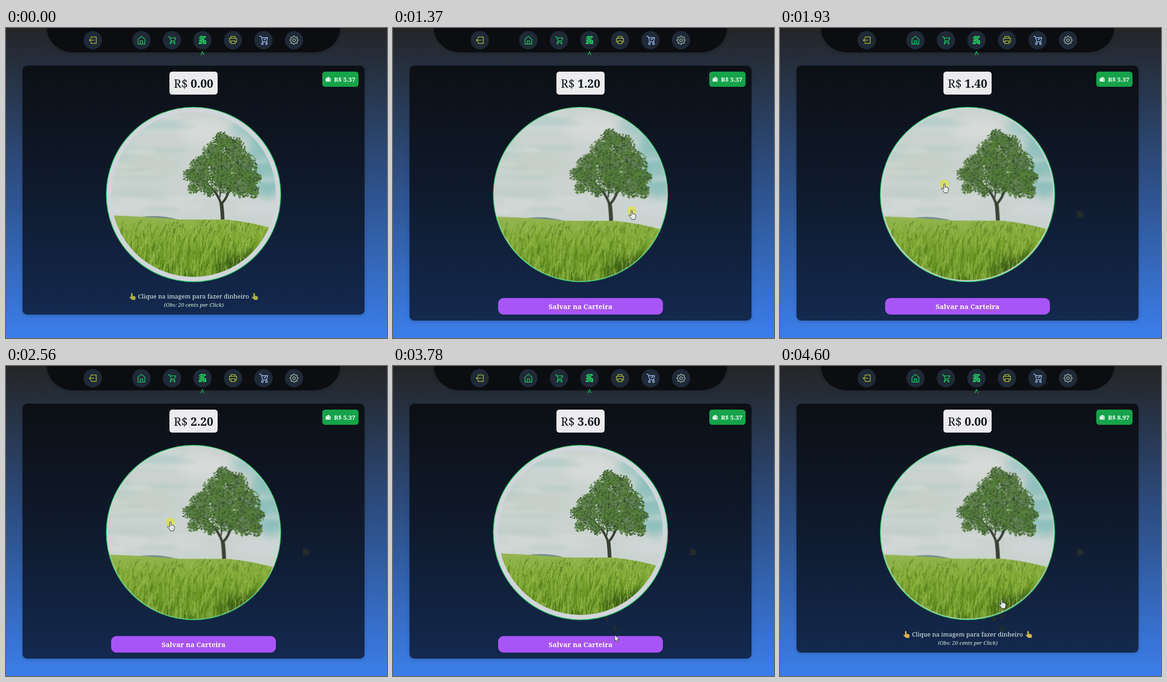
Animation of 830 by 675 pixels, one loop 4.67 s. Source, as an HTML page:

```html
<!DOCTYPE html>
<html lang="pt">
<head>
<meta charset="utf-8">
<title>Clique</title>
<style>
html, body { margin: 0; width: 100%; height: 100%; overflow: hidden; background: #2f5189; }
svg { display: block; width: 830px; height: 675px; font-family: "Noto Serif", serif; }
.line { fill: none; stroke-width: 1.6; stroke-linejoin: round; }
.lime { stroke: #a9b836; }
.green { stroke: #22c55e; }
.sky { stroke: #a5c8ff; stroke-width: 1.3; }
.grey { stroke: #9db0a4; }
.mid { text-anchor: middle; }
.hide { display: none; }
.soft { filter: blur(9px); }
.haze { filter: blur(3px); }
.shade { filter: drop-shadow(0 2px 3px #0003); }
#photo, #cursor, .hand, .arrow, .trail { animation: 4670ms linear infinite; }
#photo { animation-name: zoom; }
#cursor { animation-name: travel; }
.hand { animation-name: hand; animation-timing-function: step-end; }
.arrow { animation-name: arrow; animation-timing-function: step-end; }
.trail { fill: #262d2a; animation-timing-function: step-end; }
.t1 { animation-name: trail1; }
.t2 { animation-name: trail2; }
.t3 { animation-name: trail3; }
.t4 { animation-name: trail4; }
@keyframes zoom {
  0%, 6.2% { transform: scale(1); }
  8.8% { transform: scale(1.042); }
  12%, 33.4% { transform: scale(1.05); }
  36.4%, 37.9% { transform: scale(1); }
  41.3% { transform: scale(1.041); }
  44.3%, 77.5% { transform: scale(1.05); }
  80.7%, 94.2% { transform: scale(1); }
  98.4% { transform: scale(1.046); }
  100% { transform: scale(1.05); }
}
@keyframes travel {
  0%, 1.5% { transform: translate(808px, 662px); }
  4.3% { transform: translate(680px, 520px); }
  7% { transform: translate(545px, 416px); }
  8.5%, 30.8% { transform: translate(520px, 398px); }
  35.3%, 36.8% { transform: translate(647px, 396px); }
  40.7%, 73.4% { transform: translate(358px, 340px); }
  77.9% { transform: translate(463px, 544px); }
  80.9% { transform: translate(483px, 585px); }
  82.4%, 91.2% { transform: translate(483px, 598px); }
  97%, 100% { transform: translate(483px, 509px); }
}
@keyframes hand {
  0% { opacity: 0; } 6.4% { opacity: 1; }
  33.4% { opacity: 0; } 37.7% { opacity: 1; }
  77.9% { opacity: 0; } 81.4% { opacity: 1; }
  92.2% { opacity: 0; } 94.2% { opacity: 1; }
}
@keyframes arrow {
  0% { opacity: 0; } 1.4% { opacity: 1; } 6.4% { opacity: 0; }
  33.4% { opacity: 1; } 37.7% { opacity: 0; }
  77.9% { opacity: 1; } 81.4% { opacity: 0; }
  92.2% { opacity: 1; } 94.2% { opacity: 0; }
}
@keyframes trail1 { 0% { opacity: 0; } 36.8% { opacity: .9; } }
@keyframes trail2 { 0% { opacity: 0; } 79.2% { opacity: .9; } }
@keyframes trail3 { 0% { opacity: 0; } 80.5% { opacity: .9; } }
@keyframes trail4 { 0% { opacity: 0; } 94.8% { opacity: .9; } }
</style>
</head>
<body>
<svg viewBox="0 0 830 675">
  <defs>
    <linearGradient id="page" x2="0" y2="1">
      <stop stop-color="#242527"/><stop offset=".5" stop-color="#2d5087"/><stop offset="1" stop-color="#3b7eea"/>
    </linearGradient>
    <linearGradient id="panel" x2="0" y2="1">
      <stop stop-color="#0c1015"/><stop offset=".5" stop-color="#0f1a2d"/><stop offset="1" stop-color="#13294e"/>
    </linearGradient>
    <linearGradient id="field" x2="0" y2="1">
      <stop stop-color="#95b552"/><stop offset=".35" stop-color="#7fa834"/><stop offset=".75" stop-color="#5f8d1e"/><stop offset="1" stop-color="#4a7816"/>
    </linearGradient>
    <clipPath id="disc"><circle cx="408.5" cy="362.5" r="179.5"/></clipPath>
    <path id="hill" d="M220 408Q300 410 380 417L480 417Q540 423 600 442V550H220z"/>
    <clipPath id="onHill"><use href="#hill"/></clipPath>
    <path id="up" d="M5 0q1.700 0 1.700 1.700V6l4.800 1.200q1.800.5 1.800 2.300l-.8 5.500H5.500L.5 10.200Q-.4 8.600 1 8q1-.2 2.300 1V1.700Q3.300 0 5 0z"/>
  </defs>

  <rect width="830" height="675" fill="url(#page)"/>
  <path class="shade" d="M89 0A58 53 0 0 0 147 53H670A58 53 0 0 0 728 0z" fill="#0b0d11"/>
  <g id="dots" fill="#1f2937"></g>
  <path class="line lime" d="M185.500 23v-3.500H196.500v14h-11V30M192 26.500h-10.500M184.500 23.500l-3 3 3 3"/>
  <path class="line green" d="M287.500 24.500l7.500-6.500 7.500 6.500V35h-15zM292.500 35v-7h5v7"/>
  <path class="line green" d="M353 19h3l4 9h7l3-6.500h-13M360 28l-2 3.300h11"/>
  <g fill="#22c55e">
    <circle cx="358.500" cy="34" r="1.700"/><circle cx="367" cy="34" r="1.700"/>
    <path d="M420 21l5-4 5 1 4-1 2 4-4 1v4l4 1v8h-6v-3l-3 3h-7v-4l2-2-2-3 3-2z"/>
  </g>
  <path d="M423 21.500h9M422 25.500h4M430 24l-3 5M421 30.500h6l2 2M432 28v4M427 33v2" stroke="#1f2937" fill="none"/>
  <path class="line lime" d="M490 22.500V18.500h9v4M490 30.500h-3.200v-8h15.400v8H499M490 28h9v6h-9z"/>
  <path class="line sky" d="M552 18h4l3 12h9l2-9h-13M561.500 24l2 2 4-5"/>
  <circle class="line sky" cx="558.500" cy="34" r="2"/><circle class="line sky" cx="567.500" cy="34" r="2"/>
  <path id="gear" class="line grey"/><circle class="line grey" cx="627.500" cy="26.500" r="3"/>
  <path d="M424.500 59l3.500-8 3.500 8" class="line green" style="stroke-width:1.400"/>

  <rect id="card" class="shade" x="36" y="82" width="745" height="542" rx="10" fill="url(#panel)"/>
  <rect x="356" y="95" width="105" height="50" rx="6" fill="#ececee"/>
  <g font-size="25" fill="#10151c">
    <text x="365.500" y="129.500">R$</text>
    <text id="sum" x="451.500" y="129.500" text-anchor="end" font-weight="600">0.00</text>
  </g>
  <rect x="689" y="95" width="79" height="33" rx="6" fill="#16a34a"/>
  <path d="M696 109.500l7-3.500 3 3h1.500v8H696zM697 110.300h9" fill="#fff" stroke="#16a34a" stroke-width=".7"/>
  <rect x="704" y="112.500" width="2" height="2" fill="#16a34a"/>
  <text id="wallet" x="761" y="116.500" text-anchor="end" font-size="13.330" font-weight="600" fill="#fff">R$ 5.37</text>

  <path class="trail t1" d="M647 396l5 4 1-4 9 9-2 3 1 4-5-1-4 2-5-1z"/>
  <path class="trail t2" d="M460 548l8-3 3 9-6 3z"/>
  <path class="trail t3" d="M480 562l4 5 6 7v3l-5-1-5 2z"/>
  <circle cx="408.500" cy="362.500" r="190" fill="#d1d5db" stroke="#22c55e" stroke-width="1.670"/>
  <g transform="translate(408.500 362.500)"><g id="photo"><g transform="translate(-408.500 -362.500)" clip-path="url(#disc)">
    <rect x="225" y="180" width="370" height="370" fill="#cad3cf"/>
    <g class="soft">
      <ellipse cx="570" cy="285" rx="42" ry="85" fill="#8fc0bd"/>
      <ellipse cx="530" cy="220" rx="40" ry="22" fill="#a4c8c5"/>
      <ellipse cx="330" cy="212" rx="70" ry="12" fill="#b3cdc9"/>
      <ellipse cx="250" cy="275" rx="45" ry="16" fill="#b5cdc7"/>
      <ellipse cx="430" cy="225" rx="55" ry="26" fill="#d6dad8"/>
      <ellipse cx="310" cy="300" rx="70" ry="26" fill="#c6d0c9"/>
      <ellipse cx="280" cy="362" rx="70" ry="7" fill="#b9cac6"/>
      <ellipse cx="330" cy="388" rx="110" ry="9" fill="#d5d9d9"/>
      <ellipse cx="555" cy="392" rx="60" ry="16" fill="#d0d6d7"/>
    </g>
    <g id="clouds" class="haze" opacity=".35"></g>
    <path d="M290 412Q335 405 378 418z" fill="#71898f"/>
    <use href="#hill" fill="url(#field)"/>
    <g clip-path="url(#onHill)">
      <ellipse class="soft" cx="515" cy="518" rx="55" ry="24" fill="#3d5c18"/>
      <g id="grass" fill="none" stroke-width="1.500"></g>
    </g>
    <g fill="none" stroke="#3b4034" stroke-linecap="round">
      <path d="M472 417Q471 395 469 380" stroke-width="8" stroke-linecap="butt"/>
      <path d="M469 384Q462 362 445 345M470 382Q486 366 489 335" stroke-width="5"/>
      <path d="M466 368Q468 330 470 280M445 345L418 322M488 348L525 310" stroke-width="2.500"/>
    </g>
    <g id="tree"></g>
  </g></g></g>
  <path class="trail t4" d="M478 543l8-3 1 9-4-2-4 4z"/>

  <g id="hint" class="mid">
    <text x="408.500" y="589" font-size="13.330" fill="#e9f6ee">Clique na imagem para fazer dinheiro</text>
    <text x="409" y="607" font-size="11.670" font-style="italic" fill="#dcf3dc">(Obs: 20 cents per Click)</text>
    <g id="fingers" fill="#a9b044"><use href="#up" x="269" y="577"/><use href="#up" x="535.500" y="577"/></g>
  </g>
  <g id="save" class="mid hide">
    <rect x="229" y="588" width="359" height="36" rx="12" fill="#a855f7"/>
    <text x="408.500" y="612" font-size="15" font-weight="700" fill="#fff">Salvar na Carteira</text>
  </g>

  <g id="cursor">
    <circle id="press" class="hide" r="10" fill="#dce04a" opacity=".8"/>
    <path class="hand" fill="#e4e7e4" stroke="#22262a" d="M-1.500 1q0-2 1.500-2t1.500 2v6l1-1q1.500-.5 2 1 2-1 2.500 1 2.500 0 2 2v4l-2 5h-7l-3-5-3-3q-1-1.500 1-2 1 0 3.500 2z"/>
    <path class="arrow" fill="#eef0ee" stroke="#22262a" d="M0 0v14l3.200-2.800 2.300 4.800 2.300-1-2.300-4.700h4.500z"/>
  </g>
</svg>
<script>
const LOOP = 4670;
const $ = id => document.getElementById(id);
const add = (parent, tag, attrs) => {
  const el = document.createElementNS('http://www.w3.org/2000/svg', tag);
  for (const k in attrs) el.setAttribute(k, attrs[k]);
  parent.append(el);
};
let seed = 77;
const rnd = () => (seed = seed * 16807 % 2147483647) / 2147483647;
const num = v => v.toFixed(1);

for (const cx of [189, 295, 361.5, 428, 494.5, 561, 627.5]) add($('dots'), 'circle', { cx, cy: 26.5, r: 20 });

let teeth = '';
for (let i = 0; i < 96; i++) {
  const a = i * Math.PI / 48, r = 8 + 1.2 * Math.cos(8 * a);
  teeth += (i ? 'L' : 'M') + num(627.5 + r * Math.cos(a)) + ' ' + num(26.5 + r * Math.sin(a));
}
$('gear').setAttribute('d', teeth + 'z');

for (let i = 0; i < 28; i++) {
  add($('clouds'), 'ellipse', {
    cx: num(230 + 350 * rnd()), cy: num(190 + 210 * rnd()), rx: num(20 + 40 * rnd()), ry: num(2 + 5 * rnd()),
    fill: i % 2 ? '#e0e2e0' : '#aac6c2'
  });
}

// Leaves scattered around a few clumps
const clumps = [[472, 243, 17], [452, 268, 20], [496, 262, 24], [426, 298, 20], [403, 318, 14], [468, 300, 30], [518, 297, 26],
  [538, 325, 17], [425, 330, 20], [513, 338, 27], [474, 332, 24], [408, 348, 10], [540, 354, 13], [443, 353, 11]];
const leaves = ['', '', ''];
for (const [cx, cy, r] of clumps) {
  add($('tree'), 'circle', { cx, cy, r: r * .8, fill: '#3f5f30', opacity: .7 });
  for (let i = 0; i < r * r * .55; i++) {
    const a = rnd() * 6.283, q = r * 1.12 * Math.sqrt(rnd());
    const u = rnd() * 6 - 3, v = 2 + rnd() * 2.5;
    leaves[rnd() * 3 | 0] += `M${num(cx + q * Math.cos(a))} ${num(cy + q * Math.sin(a))}l${num(u)} ${num(v)} ${num(-v)} ${num(u)}z`;
  }
}
['#304c28', '#45692f', '#57813a'].forEach((fill, i) => add($('tree'), 'path', { d: leaves[i], fill }));

// Blades grow longer towards the viewer
const blades = ['', '', ''];
for (let i = 0; i < 1500; i++) {
  const x = 225 + 370 * rnd(), y = 425 + 135 * rnd(), h = 6 + (y - 415) * .16;
  const dark = x > 460 && y > 490 && rnd() < .5;
  blades[dark ? 2 : rnd() * 2.6 | 0] += `M${num(x)} ${num(y)}q${num(rnd() * 2)} ${num(-h * .7)} ${num(rnd() * 9 - 2)} ${num(-h)}`;
}
['#456d17', '#6d9927', '#9fc052'].forEach((stroke, i) => add($('grass'), 'path', { d: blades[2 - i], stroke, opacity: .7 }));

// Each run of clicks: first press, period, count, hold
const runs = [[400, 160, 7, 80], [1920, 143, 11, 70], [4050, 200, 1, 140]];
const SAVED = 4570;
const start = performance.now();

function draw() {
  const t = (performance.now() - start) % LOOP;
  let clicks = 0, down = false;
  for (const [from, period, count, hold] of runs) {
    for (let i = 0; i < count; i++) {
      const at = t - from - i * period;
      if (at >= 0 && at < hold) down = true;
      if (at >= hold && from < 4000) clicks++;
    }
  }
  const saved = t >= SAVED;
  if (saved) clicks = 0;
  $('sum').textContent = (clicks * .2).toFixed(2);
  $('wallet').textContent = saved ? 'R$ 8.97' : 'R$ 5.37';
  $('fingers').setAttribute('fill', saved ? '#d6b54a' : '#a9b044');
  $('card').setAttribute('height', clicks ? 555 : 542);
  $('hint').classList.toggle('hide', clicks > 0);
  $('save').classList.toggle('hide', !clicks);
  $('press').classList.toggle('hide', !down);
  requestAnimationFrame(draw);
}
draw();
</script>
</body>
</html>
```
